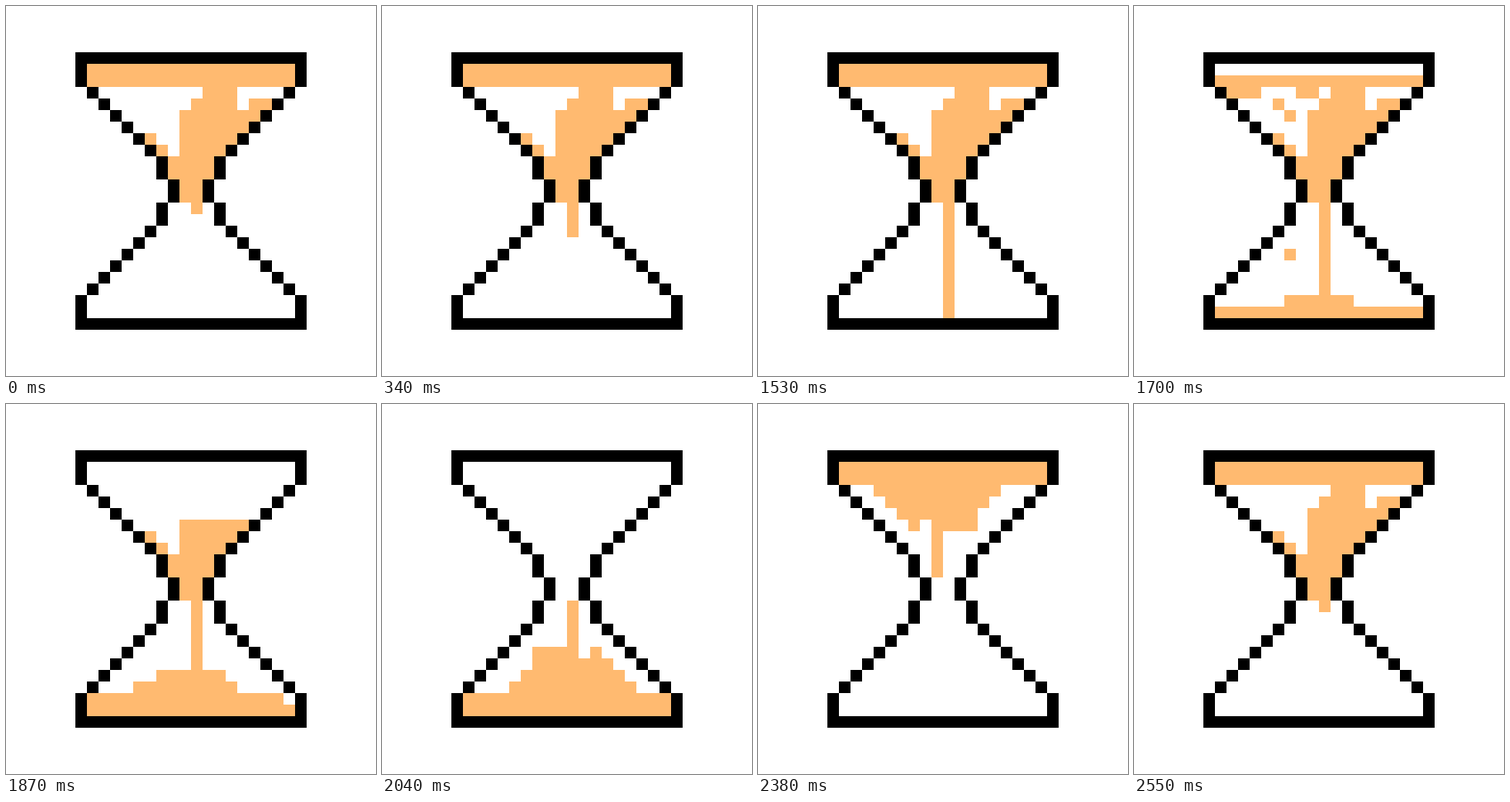
These frames come from a looping animation (480 px wide and 480 px high, 2.72 s). An HTML page without scripts:

```html
<!DOCTYPE html>
<html lang="en">
<head>
<meta charset="utf-8">
<title>Hourglass</title>
<style>
  html, body { margin: 0; height: 100%; overflow: hidden; background: #fff; }
  svg { display: block; width: 100vw; height: 100vh; shape-rendering: crispEdges; }
  .sand { fill: #ffba70; }

  /* 16 beats of 170 ms: one beat is 6.25% */
  .glass, .sand > * { animation: 2720ms step-end infinite; }
  .sand > .stream { animation-name: pour; }
  .sand > .cap { animation-name: cap; }
  .sand > .neck { animation-name: neck; }
  .sand > .bulb { animation-name: bulb; }
  .sand > .start { animation-name: start; }
  .sand > .half { animation-name: half; }
  .sand > .heap { animation-name: heap; }
  .glass { animation-name: turn; }

  @keyframes pour {
    0% { height: 1px; animation-timing-function: steps(10, jump-none); }
    62.5% { height: 10px; }
    93.75%, 100% { height: 1px; }
  }
  @keyframes cap {
    0%, 93.75%, 100% { visibility: visible; }
    62.5% { visibility: hidden; }
  }
  @keyframes neck {
    0%, 93.75%, 100% { visibility: visible; }
    68.75% { visibility: hidden; }
  }
  @keyframes bulb {
    0%, 93.75%, 100% { visibility: visible; }
    75% { visibility: hidden; }
  }
  @keyframes start {
    0%, 68.75%, 100% { visibility: hidden; }
    62.5% { visibility: visible; }
  }
  @keyframes half {
    0%, 75%, 100% { visibility: hidden; }
    68.75% { visibility: visible; }
  }
  @keyframes heap {
    0%, 93.75%, 100% { visibility: hidden; }
    75% { visibility: visible; }
  }
  @keyframes turn {
    0%, 93.75%, 100% { transform: rotate(0deg); }
    81.25% { transform: rotate(-90deg); }
    87.5% { transform: rotate(-180deg); }
  }
</style>
</head>
<body>
<svg viewBox="-16 -16 32 32">
  <defs>
    <path id="quarter" d="M1 0h1v1h1v2h1v1h1v1h1v1h1v1h1v1h1v1h1v3H0v-1H9V9h-1v-1h-1v-1h-1v-1h-1v-1h-1v-1h-1v-1h-1v-2h-1z"/>
  </defs>
  <g class="glass">
    <g class="sand" transform="translate(-16 -16)">
      <path class="cap" d="M7 5h18v2h-18z"/>
      <path class="neck" d="M17 7h3v2h1v-1h2v1h-1v1h-7v-1h1v-1h1z"/>
      <path class="bulb" d="M15 10h6v1h-1v1h-1v1h-1v2h-1v2h-2v-2h-1v-2h1zM12 11h1v1h-1zM13 12h1v1h-1z"/>
      <path class="start" d="M7 6h18v1h-18zM8 7h3v1h-3zM14 7h2v1h-2zM12 8h1v1h-1zM13 9h1v1h-1zM13 21h1v1h-1zM7 26h6v-1h6v1h6v1h-18z"/>
      <path class="half" d="M7 25h4v-1h2v-1h6v1h1v1h4v1h1v1h-18z"/>
      <path class="heap" d="M7 25h4v-1h1v-1h1v-2h4v1h1v-1h1v1h1v1h1v1h1v1h3v2h-18z"/>
      <rect class="stream" x="16" y="17" width="1" height="1"/>
    </g>
    <use href="#quarter"/>
    <use href="#quarter" transform="scale(-1 1)"/>
    <use href="#quarter" transform="scale(1 -1)"/>
    <use href="#quarter" transform="scale(-1 -1)"/>
  </g>
</svg>
</body>
</html>
```
